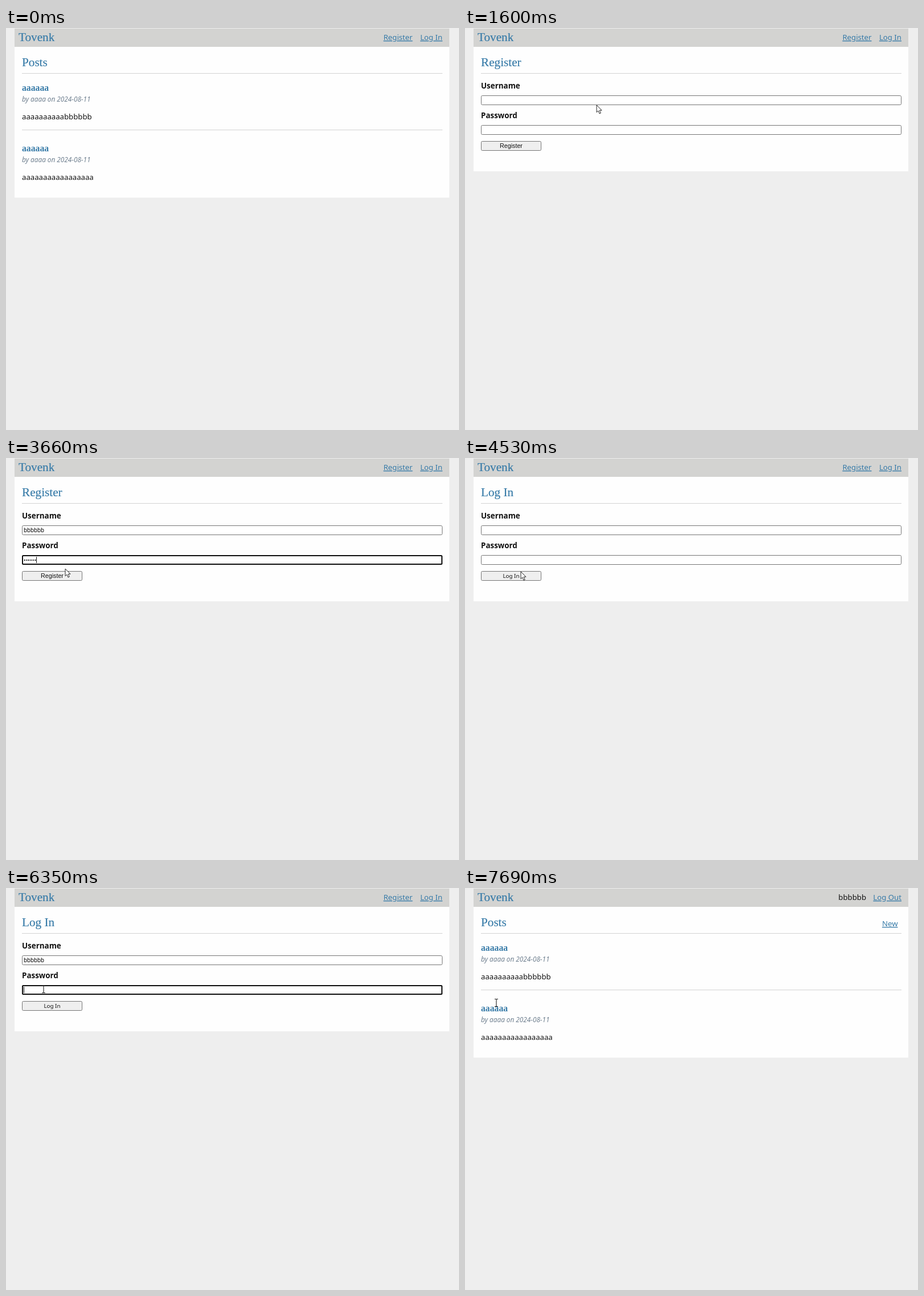
Write an HTML page that moves like this. It is 795 px wide and 704 px high and loops after 8 s.

```html
<!DOCTYPE html>
<html lang="en">
<head>
<meta charset="utf-8">
<title>Blog sign-up</title>
<style>
html, body { margin: 0; width: 100%; height: 100%; overflow: hidden; background: #eee; }
svg { display: block; }
text { font: 13.2px "Noto Sans", sans-serif; fill: #111; white-space: pre; }
.head { font: 21.2px "Liberation Serif", serif; fill: #377ba8; stroke: #377ba8; stroke-width: .2px; }
.title { font-size: 15.7px; font-weight: 700; stroke: none; }
.link { fill: #377ba8; text-decoration: underline; }
.about { font-size: 11.75px; font-style: italic; fill: #708090; }
.label { font-size: 13.4px; font-weight: 700; }
.small { font-size: 9.8px; }
.input { font: 10.7px Roboto, sans-serif; }
.dots { font-size: 9.8px; }
.hint { font-size: 10.2px; fill: #8c8080; }
.arial { font: 10.7px "Liberation Sans", sans-serif; }
.mid { text-anchor: middle; }
.end { text-anchor: end; }
.rule { fill: #d3d3d3; }
.box { fill: #fff; stroke: #767676; }
.popup { fill: #fff; filter: drop-shadow(0 1px 2px rgba(0,0,0,.2)); }
</style>
</head>
<body>
<svg id="stage" width="795" height="704" viewBox="0 0 795 704"></svg>
<script>
const LOOP = 8000;
const NS = "http://www.w3.org/2000/svg";
const stage = document.getElementById("stage");

function el(tag, attrs, parent = stage) {
  const node = document.createElementNS(NS, tag);
  for (const key in attrs) node.setAttribute(key, attrs[key]);
  parent.appendChild(node);
  return node;
}
function label(x, y, str, cls = "", parent = stage) {
  const node = el("text", { x, y, class: cls }, parent);
  node.textContent = str;
  return node;
}
const rect = (x, y, width, height, attrs, parent) => el("rect", { x, y, width, height, ...attrs }, parent);
const group = () => el("g", {});
const show = (node, on) => node.setAttribute("visibility", on ? "inherit" : "hidden");
const within = (t, a, b) => t >= a && t < b;
const clamp = v => Math.max(0, Math.min(1, v));

// Page frame
const panel = rect(15, 1, 763, 296, { fill: "#fefefe" });
rect(15, 1, 763, 32, { fill: "#d3d3d1" });
label(22, 22.5, "Tovenk", "head");
const heading = label(28, 66.5, "", "head");
rect(28, 79, 738, 1, { class: "rule" });

const guest = group();
label(713.5, 21, "Register", "link end", guest);
label(766, 21, "Log In", "link end", guest);
const member = group();
label(704, 21, "bbbbbb", "end", member);
label(766, 21, "Log Out", "link end", member);
label(759.5, 67, "New", "link end", member);

// List of posts
const posts = group();
["a".repeat(10) + "b".repeat(6), "a".repeat(17)].forEach((body, i) => {
  const y = i * 106;
  label(28, 109.5 + y, "aaaaaa", "head title", posts);
  label(28, 129 + y, "by aaaa on 2024-08-11", "about", posts);
  label(28, 160 + y, body, "", posts);
});
rect(28, 178, 738, 1, { class: "rule" }, posts);

// Form
const form = group();
function makeField(name, y, cls) {
  label(28, y - 12.5, name, "label", form);
  return {
    box: rect(28.5, y + .5, 737, 16, { class: "box", rx: 2 }, form),
    ring: rect(29, y + 1, 736, 15, { fill: "none", stroke: "#101010", "stroke-width": 2, rx: 1.5 }, form),
    text: label(31, y + 12, "", cls, form),
    caret: rect(31, y + 3, 1, 11, { fill: "#111" }, form)
  };
}
const user = makeField("Username", 118, "input");
const pass = makeField("Password", 170, "dots");
const squiggle = el("path", {
  d: "M31 132" + "q1 -1.6 2 0t2 0".repeat(9),
  fill: "none", stroke: "#d33", "stroke-width": .8
}, form);
rect(28.5, 198.5, 105, 16, { fill: "#efefef", stroke: "#767676", rx: 2 }, form);
const regButton = label(81, 210, "Register", "arial mid", form);
const logButton = label(81, 210, "Log In", "small mid", form);

// Suggestion popups
const hint = group();
rect(108, 144, 121.5, 32.5, { class: "popup", rx: 3 }, hint);
label(117, 163.5, "bbbbbb", "hint", hint);
const passHint = group();
rect(108, 197, 264, 33, { class: "popup", rx: 3 }, passHint);

// Pointer shapes, each with its hot spot at 0,0
const pointer = group();
const shapes = {
  arrow: el("path", {
    d: "M0 0V12.6L2.9 10L5 15L7.2 14L5.1 9.2H9Z", fill: "#fff", stroke: "#111", "stroke-width": .9
  }, pointer),
  beam: el("path", {
    d: "M-3 -6.5H-1Q0 -6.5 0 -5.5Q0 -6.5 1 -6.5H3M0 -5.5V5.5M-3 6.5H-1Q0 6.5 0 5.5Q0 6.5 1 6.5H3",
    fill: "none", stroke: "#222", "stroke-width": 1.1
  }, pointer),
  hand: el("path", {
    d: "M-1.5 1Q0 -1 1.5 1V6L8 7.5Q9 8 8.5 11L7.5 16H0L-4 10Q-4 8 -1.5 9Z",
    fill: "#fff", stroke: "#111", "stroke-width": .9
  }, pointer)
};

// Pointer path: time, x, y
const path = [
  [190, 712, 333], [260, 706, 225], [330, 692, 122], [500, 692, 122],
  [660, 689, 10], [900, 688, 6], [1120, 500, 80], [1320, 285, 166],
  [1390, 250, 150], [1560, 250, 150], [1600, 231, 135], [1650, 231, 135],
  [1730, 226, 125], [1980, 226, 125], [2050, 222, 141], [2600, 222, 141],
  [2850, 164, 163], [3050, 108, 179], [3450, 108, 179],
  [3660, 104, 194], [4130, 98, 199], [5000, 98, 199],
  [5330, 110, 124], [5870, 110, 124], [6280, 66, 177], [6690, 66, 177],
  [6870, 57, 192], [7350, 55, 201]
];

function pointerAt(t) {
  const i = path.findIndex(p => p[0] > t);
  if (i < 0) return path[path.length - 1].slice(1);
  if (i === 0) return null;
  const [a, b] = [path[i - 1], path[i]];
  const k = (t - a[0]) / (b[0] - a[0]);
  return [a[1] + (b[1] - a[1]) * k, a[2] + (b[2] - a[2]) * k];
}

function setField(f, str, step, focus, hover) {
  f.text.textContent = str;
  show(f.ring, focus);
  show(f.caret, focus);
  f.caret.setAttribute("x", Math.round(30.5 + str.length * step));
  f.box.style.stroke = hover ? "#333" : "#767676";
}

const typed = (t, start, span) => t < start ? 0 : Math.min(6, 1 + Math.floor((t - start) / span * 6));
const fade = (t, on, off) => clamp((t - on) / 70) * clamp(1 - (t - off) / 130);

function draw(t) {
  const onPosts = t < 860 || t >= 7690;
  const signedIn = t >= 7690;
  const login = t >= 4400;
  heading.textContent = onPosts ? "Posts" : login ? "Log In" : "Register";
  panel.setAttribute("height", onPosts ? 296 : 250);
  show(guest, !signedIn);
  show(member, signedIn);
  show(posts, onPosts);
  show(form, !onPosts);
  show(regButton, !login);
  show(logButton, login);

  const at = pointerAt(t);
  const overUser = !onPosts && at && within(at[1], 92, 134.5);
  const overPass = !onPosts && at && within(at[1], 145, 187);
  const userFocus = within(t, 1980, 3190) || within(t, 5330, 6350);
  const passFocus = within(t, 3190, 4130) || within(t, 6350, 7350);
  const name = login ? typed(t, 5530, 200) : t >= 2400 ? 6 : 0;
  const dots = login ? typed(t, 6690, 150) : typed(t, 3450, 150);
  setField(user, "b".repeat(name), 6.03, userFocus, overUser);
  setField(pass, "•".repeat(dots), 3.75, passFocus, overPass);
  show(squiggle, userFocus && name === 6);

  hint.setAttribute("opacity", fade(t, 5330, 5830));
  passHint.setAttribute("opacity", Math.max(fade(t, 3190, 3450), fade(t, 6410, 6690)));

  show(pointer, !!at);
  if (!at) return;
  const [x, y] = at;
  const inField = !onPosts && (within(y, 118, 134.5) || within(y, 170, 187));
  const shape = signedIn || inField ? "beam" : t < 920 && y < 25 ? "hand" : "arrow";
  for (const key in shapes) shapes[key].style.display = key === shape ? "" : "none";
  pointer.setAttribute("transform", `translate(${x} ${y})`);
}

function tick(now) {
  draw(now % LOOP);
  requestAnimationFrame(tick);
}
draw(0);
requestAnimationFrame(tick);
</script>
</body>
</html>
```
